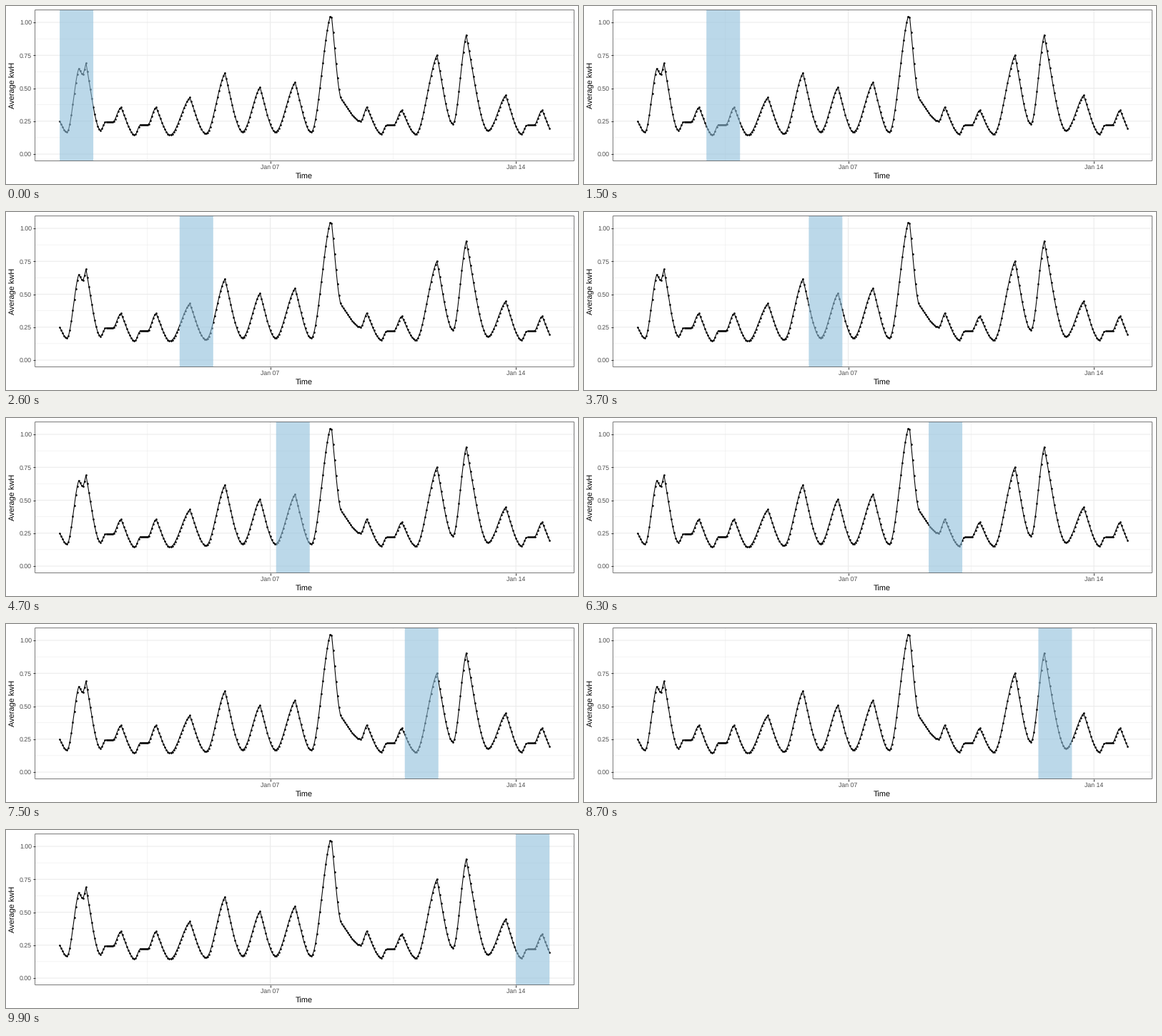
A matplotlib script for the animation above (10 s loop, 800x250 px).

```python
import numpy as np
import matplotlib.pyplot as plt
from matplotlib.animation import FuncAnimation

W, H, DPI = 800, 250, 100
PX = 72 / DPI                      # one pixel in points
FRAMES, INTERVAL = 100, 100
HOURS, SPAN = 336, 23              # two weeks of hourly data, band width
X0, X1 = 75.08, 760.2              # pixel x of first and last hour
Y0, UNIT = 208.0, 185.0            # pixel y of zero, pixels per unit
LEFT, RIGHT, TOP, BOTTOM = 40.7, 794.4, 5.45, 217.55

plt.rcParams.update({
    "font.family": "Liberation Sans",
    "path.snap": False,
    "text.hinting": "none",
})

# Daily lows and highs as (hour, load)
TURNS = [
    (0, .25), (5, .165), (13, .65), (16, .605), (18, .69),
    (28, .18), (42, .355), (51.5, .145), (66, .355),
    (75.5, .145), (89, .43), (100, .155), (113, .617),
    (125, .17), (137, .508), (147.5, .168), (161, .546),
    (172, .165), (185, 1.045), (186, 1.04), (193, .41),
    (206, .25), (210, .358), (220, .153), (234, .333),
    (243.5, .152), (258, .752), (269, .228), (278, .905),
    (293, .18), (305, .447), (316, .153), (330, .333), (339, .14),
]


def ramp(u, bulge=2.0):
    """Ease from 0 to 1, flat at the foot; bulge 2 is also flat at the top."""
    u = np.clip(u, 0, 1)
    return u * u * (1 + bulge * (1 - u))


def swing(t, start, end):
    """Load between two neighbouring turning points."""
    (h0, v0), (h1, v1) = start, end
    s = (t - h0) / (h1 - h0)
    rate = (v1 - v0) / (h1 - h0)
    if rate < 0:
        return v1 + (v0 - v1) * ramp(1 - s, 0.8)
    if rate < 0.016:               # quiet day: morning shelf, evening bump
        shape = 0.37 * ramp(s / 0.25) + 0.63 * ramp((s - 0.6) / 0.4)
    else:
        shape = ramp(s, 1.5)
    return v0 + (v1 - v0) * shape


def load_curve(t):
    load = np.zeros(len(t))
    for start, end in zip(TURNS, TURNS[1:]):
        part = (t >= start[0]) & (t < end[0])
        load[part] = swing(t[part], start, end)
    return load


def hour_at(px):
    return (px - X0) / (X1 - X0) * (HOURS - 1)


def px_at(hour):
    return X0 + hour * (X1 - X0) / (HOURS - 1)


def load_at(py):
    return (Y0 - py) / UNIT


def label(px, py, text, size, color, ha="center", **kw):
    fig.text(px / W, 1 - py / H, text, fontsize=size * PX, color=color,
             ha=ha, va="baseline", **kw)


fig = plt.figure(figsize=(W / DPI, H / DPI), dpi=DPI, facecolor="white")
ax = fig.add_axes([LEFT / W, 1 - BOTTOM / H,
                   (RIGHT - LEFT) / W, (BOTTOM - TOP) / H])
ax.set_xlim(hour_at(LEFT), hour_at(RIGHT))
ax.set_ylim(load_at(BOTTOM), load_at(TOP))

days = {"Jan 07": 6 * 24, "Jan 14": 13 * 24}
levels = np.linspace(0, 1, 5)
ax.set_xticks(list(days.values()), labels=[])
ax.set_yticks(levels, labels=[])
ax.tick_params(length=2.75 * PX, width=1.07 * PX, color="#333333")

# Grid
for hours, loads, width in (
    ([60, 228], levels[:-1] + 0.125, 0.53),
    (days.values(), levels, 1.07),
):
    style = dict(color="#ebebeb", lw=width * PX, zorder=0)
    for h in hours:
        ax.axvline(h, **style)
    for v in loads:
        ax.axhline(v, **style)

for spine in ax.spines.values():
    spine.set(color="#333333", linewidth=0.65 * PX, capstyle="butt", zorder=5)

# Labels
for text, h in days.items():
    label(px_at(h), 229.1, text, 8.8, "#4d4d4d")
for v in levels:
    label(36, Y0 - v * UNIT + 3.4, f"{v:.2f}", 8.8, "#4d4d4d", ha="right")
label((LEFT + RIGHT) / 2 - 0.4, 242.5, "Time", 11, "black")
label(13.2, (TOP + BOTTOM) / 2, "Average kwH", 11, "black",
      rotation=90, rotation_mode="anchor")

# Series
t = np.arange(HOURS)
ax.plot(t, load_curve(t), color="black", lw=1.07 * PX, marker="o",
        ms=2.7 * PX, mew=0, solid_joinstyle="round", zorder=2)

band = ax.axvspan(0, SPAN, facecolor="#8fbfdb", alpha=0.6, lw=0,
                  snap=True, zorder=3)


def update(k):
    band.set_x(round(k * (HOURS - 1 - SPAN) / (FRAMES - 1)))
    return (band,)


anim = FuncAnimation(fig, update, frames=FRAMES, interval=INTERVAL,
                     repeat=True, repeat_delay=0, blit=False)
plt.show()
```
